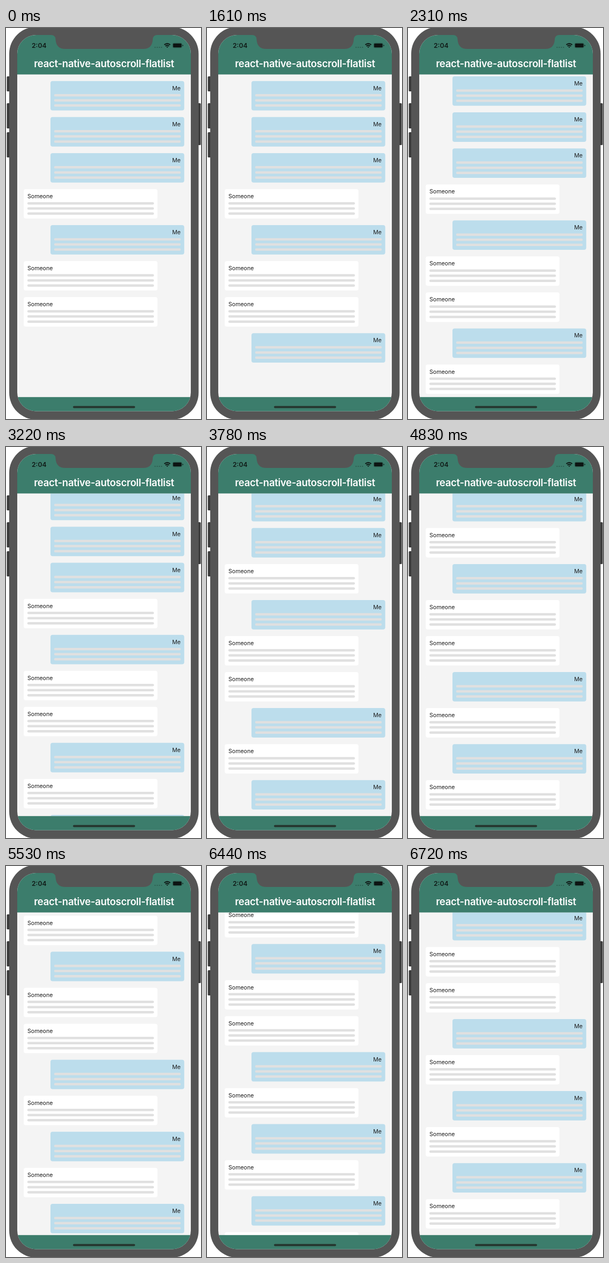
Recreate the animation shown at these times as an HTML page. Size 364 by 728 pixels, loop 6790 ms.

```html
<!DOCTYPE html>
<html lang="en">
<head>
<meta charset="utf-8">
<title>Auto-scrolling list</title>
<style>
  html, body { margin: 0; width: 100%; height: 100%; overflow: hidden; background: #fff; }
  svg { display: block; width: 364px; height: 728px; }
  text { font-family: Inter, Roboto, "Liberation Sans", sans-serif; }
  .title { font-size: 18.5px; font-weight: 600; letter-spacing: -.27px; fill: #fff; text-anchor: middle; }
  .clock { font-size: 12.2px; font-weight: 600; fill: #101a17; }
  .name { font-size: 10.6px; fill: #1c1c1c; }
</style>
</head>
<body>
<svg viewBox="0 0 364 728" xmlns="http://www.w3.org/2000/svg">
  <defs>
    <clipPath id="screen"><rect x="21" y="13" width="324" height="700.5" rx="35"/></clipPath>
    <clipPath id="viewport"><rect x="21" y="86.5" width="324" height="600.7"/></clipPath>
  </defs>
  <rect width="364" height="728" fill="#fff"/>

  <g fill="#3b3b3b">
    <rect x="1.5" y="90" width="7" height="28" rx="1.5"/>
    <rect x="1.5" y="140" width="7" height="47" rx="1.5"/>
    <rect x="1.5" y="194" width="7" height="47" rx="1.5"/>
    <rect x="356" y="140" width="7.5" height="78" rx="1.5"/>
  </g>
  <rect x="6" y="-2" width="353.5" height="731" rx="50" fill="#555"/>

  <g clip-path="url(#screen)">
    <rect x="21" y="13" width="324" height="701" fill="#f4f4f4"/>
    <g clip-path="url(#viewport)"><g id="list"></g></g>
    <rect x="21" y="13" width="324" height="73.5" fill="#3c7d6c"/>
    <rect x="21" y="687.2" width="324" height="27" fill="#3c7d6c"/>
    <path fill="#555" d="M84 12v1q8 0 8.500 8q1 18 18 18H256q17 0 18-18q.5-8 8.500-8v-1z"/>
  </g>

  <text class="clock" x="48" y="37">2:04</text>
  <text class="title" x="183" y="73">react-native-autoscroll-flatlist</text>

  <g fill="#2c5b4f">
    <circle cx="278.300" cy="36" r="1.100"/>
    <circle cx="282.300" cy="36" r="1.100"/>
    <circle cx="286.300" cy="36" r="1.100"/>
    <circle cx="290.300" cy="36" r="1.100"/>
  </g>
  <g fill="none" stroke="#0d1412" stroke-width="1.900">
    <path d="M295.500 31.300q5.500-4.700 11 0M297.600 33.700q3.400-2.900 6.800 0"/>
    <path d="M299.300 35l1.700 1.900l1.700-1.900q-1.700-1.200-3.400 0z" fill="#0d1412" stroke="none"/>
  </g>
  <g fill="#0d1412">
    <rect x="311.800" y="28.800" width="15.900" height="7.400" rx="1.600"/>
    <rect x="311" y="28" width="17.500" height="9" rx="2.500" fill="none" stroke="#2c5b4f" stroke-width=".7"/>
    <path d="M329.500 31v3q1.300-.5 1.300-1.500t-1.300-1.500z"/>
  </g>
  <rect x="125" y="703.800" width="116" height="4" rx="2" fill="#26362f"/>
</svg>

<script>
const LOOP = 6790, TICK = 70, SCROLL_TIME = 350;
const FIRST_TOP = 98.8, PITCH = 67.05, FIRST_SCROLL = 15;
const SENDERS = "MMMSMSSMSMSMS";
const START_COUNT = 7;
const ARRIVALS = [1050, 2100, 3080, 4200, 5250, 6440];
const SCROLL_STARTS = [2118, 3174, 4218, 5268, 6370];

const list = document.getElementById("list");

function add(parent, tag, attrs, text = "") {
  const node = document.createElementNS("http://www.w3.org/2000/svg", tag);
  for (const key in attrs) node.setAttribute(key, attrs[key]);
  node.textContent = text;
  return parent.appendChild(node);
}

function makeMessage(sender, index) {
  const mine = sender === "M";
  const x = mine ? 83 : 33;
  const group = add(list, "g", { transform: `translate(${x} ${FIRST_TOP + index * PITCH})` });
  add(group, "rect", { width: 249.7, height: 54.8, rx: 4, fill: mine ? "#bcddec" : "#fff" });
  add(group, "text", {
    class: "name", x: mine ? 243 : 7, y: 17.1, "text-anchor": mine ? "end" : "start"
  }, mine ? "Me" : "Someone");
  for (let row = 0; row < 3; row++) {
    add(group, "rect", { x: 6.8, y: 24.2 + row * 9.55, width: 236.4, height: 4.5, rx: 2.25, fill: "#e0e0e0" });
  }
  return group;
}

const messages = [...SENDERS].map(makeMessage);

const clamp = v => Math.min(1, Math.max(0, v));

// Ease-in-out: cubic bezier (.42, 0, .58, 1), solved for x by bisection.
function ease(x) {
  let lo = 0, hi = 1;
  for (let i = 0; i < 20; i++) {
    const s = (lo + hi) / 2;
    const bx = 3 * (1 - s) ** 2 * s * .42 + 3 * (1 - s) * s * s * .58 + s ** 3;
    if (bx < x) lo = s; else hi = s;
  }
  return lo * lo * (3 - 2 * lo);
}

function scrollAt(t) {
  return SCROLL_STARTS.reduce((sum, start, i) => {
    const p = clamp((t - start) / SCROLL_TIME);
    return p === 0 ? sum : sum + (p === 1 ? 1 : ease(p)) * (i ? PITCH : FIRST_SCROLL);
  }, 0);
}

function draw(time) {
  const t = Math.floor((time % LOOP) / TICK) * TICK;
  const count = START_COUNT + ARRIVALS.filter(a => t >= a).length;
  messages.forEach((m, i) => m.setAttribute("visibility", i < count ? "visible" : "hidden"));
  list.setAttribute("transform", `translate(0 ${-scrollAt(t).toFixed(2)})`);
}

const begin = performance.now();
function frame() {
  draw(performance.now() - begin);
  requestAnimationFrame(frame);
}
frame();
</script>
</body>
</html>
```
